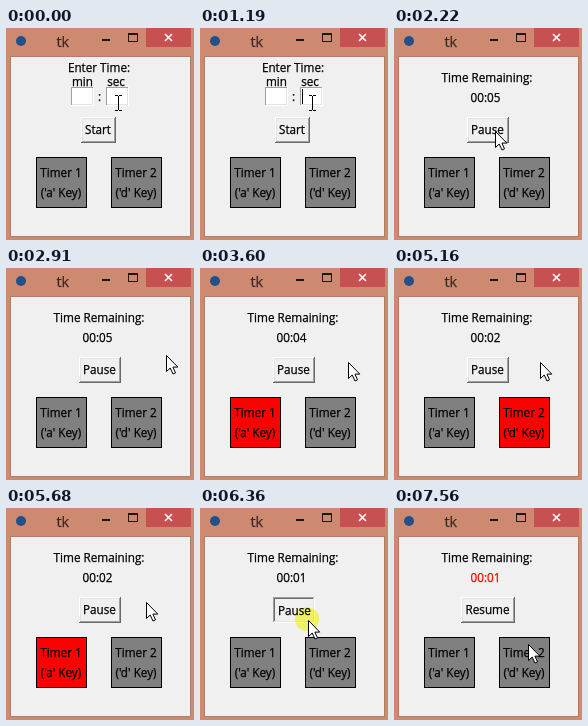
Animation of 188x212 px, one loop 8 s. Source, as an HTML page with a canvas:

```html
<!DOCTYPE html>
<html lang="en">
<head>
<meta charset="utf-8">
<title>tk</title>
<style>
html, body { margin: 0; width: 188px; height: 212px; overflow: hidden; background: #cd8a70; }
canvas { display: block; }
</style>
</head>
<body>
<canvas id="stage" width="188" height="212"></canvas>
<script>
const ctx = document.getElementById('stage').getContext('2d', { alpha: false });
const FONT = '"Open Sans", "Noto Sans", sans-serif';
const FACE = '#f0f0f0', TRIM = '#cd8a70', GREY = '#a0a0a0', DARK = '#696969', PALE = '#e3e3e3';

// The screen refreshes in steps; every time below counts steps.
const LOOP = 8000, STEP = 172, LEAD = 20;
const SECOND = 6;
const FOCUS = 2, TYPED = 8, PRESS = 11, RUN = 12, KEYS = 19, HALT = 37, PAUSED = 38;

// Pointer moves: first step, last step, destination.
const moves = [
  { from: 8, to: 11, x: 101, y: 103 },
  { from: 13, to: 17, x: 160, y: 87 },
  { from: 19, to: 21, x: 148, y: 94 },
  { from: 27, to: 28, x: 146, y: 94 },
  { from: 31, to: 33, x: 140, y: 94 },
  { from: 34, to: 37, x: 108, y: 112 },
  { from: 39, to: 41, x: 176, y: 17 },
  { from: 41, to: 44, x: 134, y: 136 }
];

const clamp = v => Math.min(1, Math.max(0, v));
const ease = p => p * p * (3 - 2 * p);

function pointer(n) {
  let x = 112, y = 75;
  for (const m of moves) {
    const p = ease(clamp((n - m.from) / (m.to - m.from)));
    x += (m.x - x) * p;
    y += (m.y - y) * p;
  }
  return [Math.round(x), Math.round(y)];
}

function activeTimer(n) {
  const turn = Math.floor((n - KEYS) / SECOND);
  return turn >= 0 && turn < 3 ? 1 + turn % 2 : 0;
}

function rect(x, y, w, h, color) {
  ctx.fillStyle = color;
  ctx.fillRect(x, y, w, h);
}

function text(str, x, y, { color = '#000', size = 11.7, align = 'center' } = {}) {
  ctx.font = size + 'px ' + FONT;
  ctx.textAlign = align;
  ctx.fillStyle = ctx.strokeStyle = color;
  ctx.lineWidth = 0.25;
  ctx.fillText(str, x, y);
  ctx.strokeText(str, x, y);
}

// Two-pixel border: outer and inner pairs of top-left and bottom-right colours.
function bevel(x, y, w, h, pairs, fill) {
  pairs.forEach(([light, shade], i) => {
    rect(x + i, y + i, w - 2 * i, h - 2 * i, shade);
    rect(x + i, y + i, w - 2 * i - 1, h - 2 * i - 1, light);
  });
  rect(x + 2, y + 2, w - 4, h - 4, fill);
}

function button(label, x, w, pressed) {
  const pairs = pressed ? [[GREY, '#fff'], [DARK, PALE]] : [['#fff', DARK], [PALE, GREY]];
  bevel(x, 89, w, 26, pairs, FACE);
  const d = pressed ? 1 : 0;
  text(label, x + w / 2 - 0.5 + d, 105.5 + d);
}

function entry(x) {
  bevel(x, 59, 23, 19, [[GREY, '#fff'], ['#fff', PALE]], '#fff');
}

function timer(id, key, x, on) {
  rect(x, 129, 51, 51, '#000');
  rect(x + 1, 130, 49, 49, on ? '#f00' : '#808080');
  text('Timer ' + id, x + 25, 149);
  text("('" + key + "' Key)", x + 25, 169);
}

function disc(x, y, r, color) {
  ctx.fillStyle = color;
  ctx.beginPath();
  ctx.arc(x, y, r, 0, 7);
  ctx.fill();
}

function windowFrame() {
  rect(0, 0, 188, 212, TRIM);
  disc(15, 13, 5, '#24508a');
  text('tk', 50.5, 19, { color: '#3a2a26', size: 14.5, align: 'left' });
  rect(96, 11, 8, 2, '#1a1a1a');
  rect(122, 5, 10, 9, '#1a1a1a');
  rect(123, 7, 8, 6, TRIM);
  rect(140, 0, 45, 19, '#c75050');
  ctx.strokeStyle = '#fff';
  ctx.lineWidth = 1.6;
  ctx.beginPath();
  ctx.moveTo(159, 6); ctx.lineTo(166, 13);
  ctx.moveTo(166, 6); ctx.lineTo(159, 13);
  ctx.stroke();
  rect(4, 28, 181, 181, '#b67b65');
  rect(5, 29, 179, 179, FACE);
}

function arrow(x, y) {
  ctx.save();
  ctx.translate(x + 0.5, y + 0.5);
  const shape = new Path2D('M0 0V16L3.7 12.5L6.5 18.5L9 17.4L6.4 11.6H11.3Z');
  ctx.fillStyle = '#fff';
  ctx.fill(shape);
  ctx.strokeStyle = '#000';
  ctx.lineWidth = 1;
  ctx.stroke(shape);
  ctx.restore();
}

function beam(x, y) {
  rect(x, y - 7, 1, 14, '#000');
  for (const dy of [-8, 7]) {
    rect(x - 3, y + dy, 3, 1, '#000');
    rect(x + 1, y + dy, 3, 1, '#000');
  }
}

function highlight(x, y) {
  ctx.globalCompositeOperation = 'multiply';
  disc(x, y, 12, '#ffff6a');
  ctx.globalCompositeOperation = 'source-over';
}

function form(n) {
  const typed = n >= TYPED;
  text('Enter Time:', 93, 44);
  text('min', 76.5, 58);
  text('sec', 110, 58);
  entry(65);
  entry(100);
  text(':', 93.5, 72.5);
  if (typed) text('5', 102, 73, { align: 'left' });
  if (n >= FOCUS && (n - FOCUS) % 5 < 3) rect(typed ? 109 : 102, 61, 1, 15, '#000');
  button('Start', 75, 35, n >= PRESS);
}

function countdown(n) {
  const paused = n >= PAUSED;
  const left = 5 - Math.floor((Math.min(n, PAUSED) - RUN) / SECOND);
  text('Time Remaining:', 93, 54);
  text('00:0' + left, 91.5, 74, { color: paused ? '#f00' : '#000' });
  if (paused) button('Resume', 67, 54, false);
  else button('Pause', 73, 42, n >= HALT);
}

function draw(n) {
  windowFrame();
  if (n < RUN) form(n);
  else countdown(n);
  const on = activeTimer(n);
  timer(1, 'a', 30, on === 1);
  timer(2, 'd', 105, on === 2);

  const [x, y] = pointer(n);
  if ([FOCUS, PRESS, HALT].includes(n)) highlight(x - 1, y - 1);
  (n <= TYPED ? beam : arrow)(x, y);
}

function tick(now) {
  draw(Math.floor((now % LOOP + LEAD) / STEP));
  requestAnimationFrame(tick);
}
draw(0);
requestAnimationFrame(tick);
</script>
</body>
</html>
```
